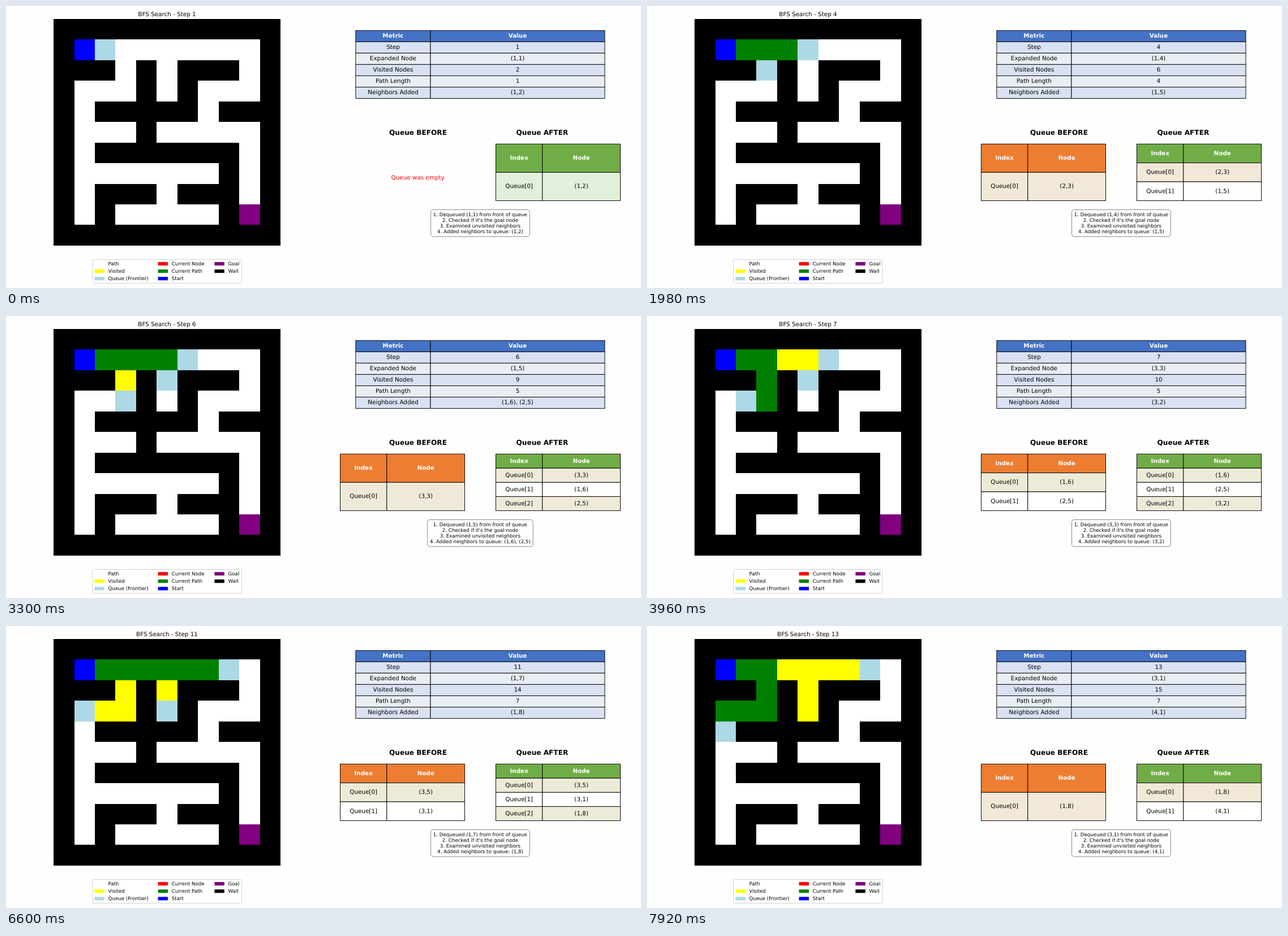
Animation of 1122 by 499 pixels, one loop 8000 ms. Source, as an HTML page:

```html
<!DOCTYPE html>
<html lang="en">
<head>
<meta charset="utf-8">
<title>BFS Search</title>
<style>
  html, body { margin: 0; width: 100%; height: 100%; overflow: hidden; background: #fefefe; }
  svg { display: block; font-family: "DejaVu Sans", sans-serif; text-rendering: geometricPrecision; }
</style>
</head>
<body>
<svg id="stage" width="1122" height="499" viewBox="0 0 1122 499"></svg>
<script>
const STEP_MS = 660, LOOP_MS = 8000;
const SMALL = 8.66, BODY = 10.39, HEAD = 12.12;
const BLUE = '#4472c4', ORANGE = '#ed7d31', GREEN = '#70ad47';
const MAZE = [
  '###########',
  '#.........#',
  '###.#.###.#',
  '#...#.#...#',
  '#.#####.###',
  '#...#.....#',
  '#.#######.#',
  '#.......#.#',
  '#.###.###.#',
  '#.#.....#.#',
  '###########'
];
const START = '1,1', GOAL = '9,9';
const stage = document.getElementById('stage');

// Run the search up to the given step and report its state.
function search(steps) {
  const parent = { [START]: null };
  let queue = [START], node, before, added;
  for (let i = 0; i < steps; i++) {
    node = queue.shift();
    before = [...queue];
    const [r, c] = node.split(',').map(Number);
    added = [[r, c + 1], [r + 1, c], [r, c - 1], [r - 1, c]]
      .filter(([y, x]) => MAZE[y][x] === '.' && !([y, x] in parent))
      .map(String);
    for (const n of added) parent[n] = node;
    queue.push(...added);
  }
  const path = [];
  for (let n = node; n; n = parent[n]) path.push(n);
  return { node, before, after: queue, added, path, visited: Object.keys(parent) };
}

const rect = (x, y, w, h, fill, more = '') =>
  `<rect x="${x}" y="${y}" width="${w}" height="${h}" fill="${fill}" ${more}/>`;

const text = (str, x, y, size, more = '') =>
  `<text x="${x}" y="${y}" font-size="${size}" ${more}>${str}</text>`;

const mid = 'text-anchor="middle" ';
const bold = 'font-weight="bold" ';
const label = n => `(${n})`;

function maze({ path, after, visited }) {
  const edgeX = i => Math.round(84.1 + 36.45 * i);
  const edgeY = i => Math.round(22.95 + 36.45 * i);
  const colour = (r, c) => {
    const key = `${r},${c}`;
    if (MAZE[r][c] === '#') return 'black';
    if (key === START) return 'blue';
    if (key === GOAL) return 'purple';
    if (path.includes(key)) return 'green';
    if (after.includes(key)) return 'lightblue';
    return visited.includes(key) ? 'yellow' : 'white';
  };
  let out = '';
  MAZE.forEach((row, r) => [...row].forEach((_, c) => {
    const x = edgeX(c), y = edgeY(r);
    out += rect(x, y, edgeX(c + 1) - x, edgeY(r + 1) - y, colour(r, c));
  }));
  return `<g shape-rendering="crispEdges">${out}</g>`;
}

function legend() {
  const columns = [
    [156.4, [['Path', 'white'], ['Visited', 'yellow'], ['Queue (Frontier)', 'lightblue']]],
    [268.6, [['Current Node', 'red'], ['Current Path', 'green'], ['Start', 'blue']]],
    [368.4, [['Goal', 'purple'], ['Wall', 'black']]]
  ];
  let out = rect(152.7, 448.5, 263.5, 42, 'white', 'rx="1.8" stroke="#ccc" stroke-width=".9"');
  for (const [x, items] of columns)
    items.forEach(([name, fill], i) => {
      const y = 459.2 + 13.1 * i;
      out += rect(x, y - 6.1, 17.4, 6.1, fill) + text(name, x + 24.2, y, SMALL);
    });
  return out;
}

// xs: left edge, column split, right edge; first row is the header.
function table(xs, top, height, rows, headFill, fills) {
  const h = height / rows.length;
  let out = '';
  rows.forEach((row, r) => row.forEach((str, c) => {
    const x = xs[c], w = xs[c + 1] - x, y = top + h * r;
    const fill = r ? fills[(r - 1) % 2] : headFill;
    out += rect(x, y, w, h, fill, 'stroke="black" stroke-width=".95"') +
      text(str, x + w / 2, y + h / 2 + 2.9, BODY, mid + (r ? '' : bold + 'fill="white"'));
  }));
  return out;
}

const queueTable = (x, nodes, headFill, fill) => table(
  [x, x + 82.3, x + 220], 244.2, 100.3,
  [['Index', 'Node'], ...nodes.map((n, i) => [`Queue[${i}]`, label(n)])],
  headFill, [fill, 'white']);

// Both queues share one tint, blended by the area each one shades.
function tint(before, after) {
  const area = q => Math.ceil(q.length / 2) / (q.length + 1);
  const a = area(before), b = area(after), peach = [252, 228, 214], mint = [226, 239, 218];
  return `rgb(${peach.map((p, i) => Math.round((p * a + mint[i] * b) / (a + b)))})`;
}

function draw(step) {
  const s = search(step);
  const added = s.added.map(label).join(', ');
  const fill = tint(s.before, s.after);
  const notes = [
    `1. Dequeued ${label(s.node)} from front of queue`,
    "2. Checked if it's the goal node",
    '3. Examined unvisited neighbors',
    added ? `4. Added neighbors to queue: ${added}` : '4. No new neighbors to add'
  ];
  stage.innerHTML =
    text(`BFS Search - Step ${step}`, 284.5, 18, BODY, mid) + maze(s) + legend() +
    table([617.9, 750, 1058], 43.3, 120.2, [
      ['Metric', 'Value'],
      ['Step', step],
      ['Expanded Node', label(s.node)],
      ['Visited Nodes', s.visited.length],
      ['Path Length', s.path.length],
      ['Neighbors Added', added || 'None']
    ], BLUE, ['#d9e1f2', '#e9edf4']) +
    text('Queue BEFORE', 728, 227.8, HEAD, mid + bold) +
    text('Queue AFTER', 947.4, 227.8, HEAD, mid + bold) +
    (s.before.length
      ? queueTable(590.5, s.before, ORANGE, fill)
      : text('Queue was empty', 727.7, 307, BODY, mid + 'fill="red"')) +
    queueTable(865.5, s.after, GREEN, fill) +
    rect(0, 360.4, 0, 47.6, 'white', 'id="frame" rx="4.3" stroke="gray" stroke-width=".95"') +
    `<g id="notes">${notes.map((n, i) => text(n, 837.9, 372 + 9.97 * i, SMALL, mid)).join('')}</g>`;

  const box = document.getElementById('notes').getBBox();
  const frame = document.getElementById('frame');
  frame.setAttribute('x', box.x - 4.3);
  frame.setAttribute('width', box.width + 8.6);
}

let shown = 0;
function tick() {
  const step = Math.floor(performance.now() % LOOP_MS / STEP_MS) + 1;
  if (step !== shown) draw(shown = step);
  requestAnimationFrame(tick);
}
tick();
</script>
</body>
</html>
```
